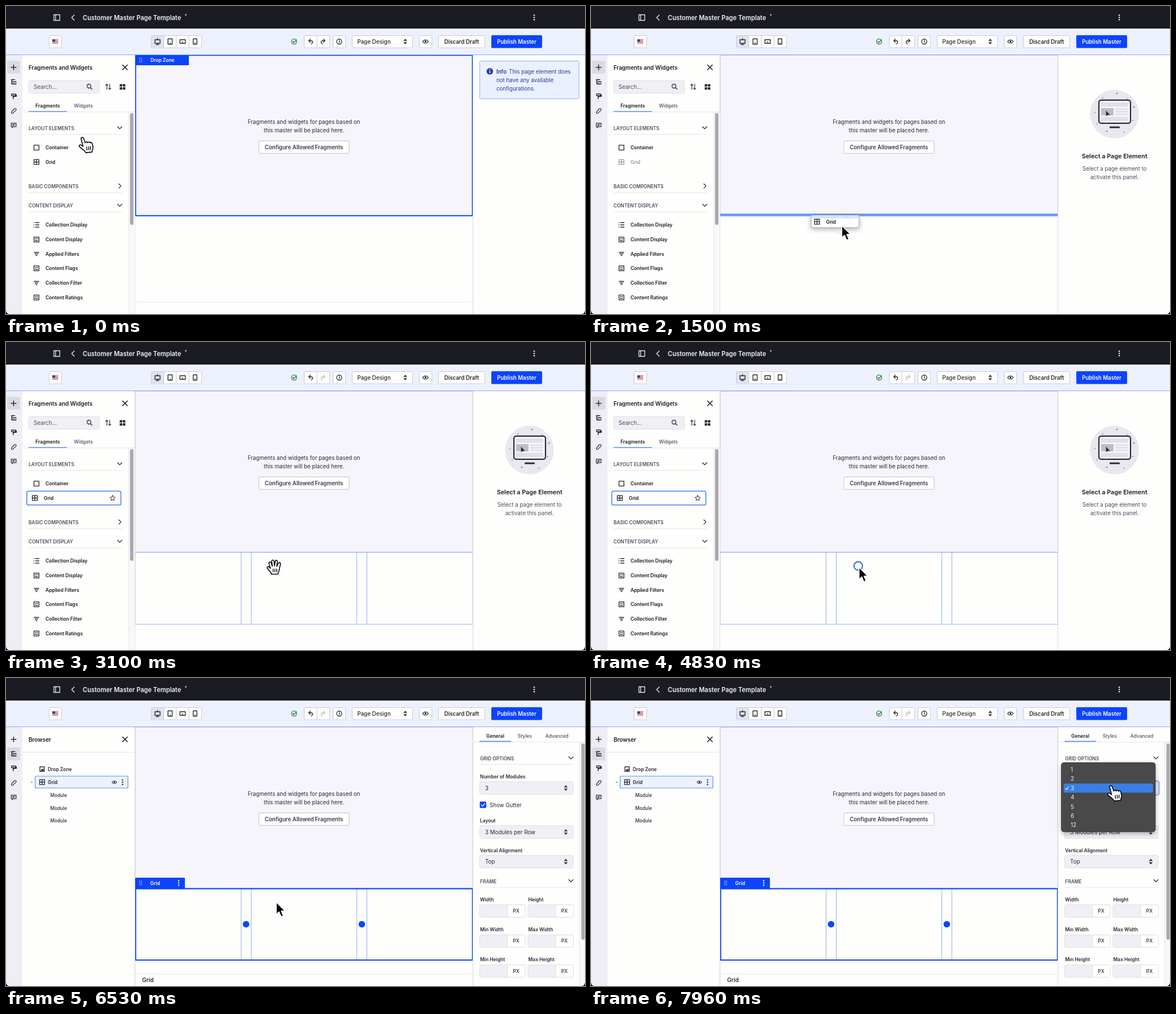
An HTML page that plays this animation: 1026x546 px, repeating every 8 s.

```html
<!DOCTYPE html>
<html lang="en">
<head>
<meta charset="utf-8">
<title>Page editor</title>
<style>
html, body { margin: 0; width: 100%; height: 100%; overflow: hidden; background: #fefefc; }
svg { display: block; width: 100vw; height: 100vh; }
text { font-family: Inter, "Open Sans", sans-serif; white-space: pre; }
</style>
</head>
<body>
<svg id="stage" viewBox="0 0 1026 546"></svg>
<script>
const INK = '#272833', DARK = '#1b1b24', GREY = '#4d4d60', BLUE = '#0b44fb', SOFT = '#5b8ff5',
  EDGE = '#cbcbd6', RULE = '#e5e5ec', FIELD = '#efeff5', PAPER = '#fefefc';

// Drawing helpers
const rect = (x, y, w, h, fill, stroke = 'none', r = 0, sw = 1) =>
  `<rect x="${x}" y="${y}" width="${w}" height="${h}" rx="${r}" fill="${fill}" stroke="${stroke}" stroke-width="${sw}"/>`;
const path = (d, stroke = INK, sw = 1.3, fill = 'none') =>
  `<path d="${d}" fill="${fill}" stroke="${stroke}" stroke-width="${sw}" stroke-linejoin="round" stroke-linecap="round"/>`;
const rule = (x1, y1, x2, y2, color = RULE, sw = 1) =>
  `<path d="M${x1} ${y1}L${x2} ${y2}" stroke="${color}" stroke-width="${sw}"/>`;
const dot = (x, y, r, fill = INK, stroke = 'none', sw = 1.2) =>
  `<circle cx="${x}" cy="${y}" r="${r}" fill="${fill}" stroke="${stroke}" stroke-width="${sw}"/>`;
const text = (x, y, s, size = 9.7, weight = 400, fill = INK, anchor = 'start') =>
  `<text x="${x}" y="${y + size * .364}" font-size="${size}" font-weight="${weight}" fill="${fill}" text-anchor="${anchor}">${s}</text>`;
const at = (x, y, body) => `<g transform="translate(${x} ${y})">${body}</g>`;
const group = (id, body) => `<g id="${id}">${body}</g>`;
const dots = (x, y, color) => [-4, 0, 4].map(d => dot(x, y + d, 1.25, color)).join('');
const grip = (x, y) => [-3, 0, 3].map(d => dot(x - 1.5, y + d, .8, '#fff') + dot(x + 1.5, y + d, .8, '#fff')).join('');
const chevron = (x, y) => path(`M${x - 3.8} ${y - 2}l3.8 3.8 3.8-3.8`);
const updown = (x, y) => path(`M${x - 2.6} ${y - 1.6}l2.6-3 2.6 3zM${x - 2.6} ${y + 1.6}l2.6 3 2.6-3z`, INK, .6, INK);
const closeX = () => path('M206.5 104.5l8.5 8.5m0-8.5l-8.5 8.5', DARK, 1.6);
const eye = (x, y, k = 1) => at(x, y, `<g transform="scale(${k})">` +
  path('M-5 0C-2.5-4 2.5-4 5 0C2.5 4-2.5 4-5 0Z', INK, 1.2) + dot(0, 0, 1.8) + '</g>');
const button = (x, w, body = '') => rect(x + .5, 52.5, w - 1, 21.5, PAPER, EDGE, 2) + body;

const icons = {
  box: path('M-4.4-4.4h8.8v8.8h-8.8z'),
  grid: path('M-4.4-4.4h8.8v8.8h-8.8zM0-4.4v8.8M-4.4 0h8.8'),
  list: path('M-1.5-4h6M-1.5 0h6M-1.5 4h6M-4.6-4h.4M-4.6 0h.4M-4.6 4h.4', INK, 1.4),
  content: path('M-4.4-4.4h8.8v8.8h-8.8z') + path('M-2-1.5h1.2M1-1.5h1.2M-2 1.8h4', INK, 1.5),
  filter: path('M-4.2-2.8h8.4M-2.6 0h5.2M-1 2.8h2', INK, 1.4),
  image: path('M-4-4h8v8h-8z') + path('M-2.4 2.6l2-2.6 1.4 1 1.4-2v3.6z', INK, .6, INK),
};
const item = (name, y, icon, x = 54) => at(x, y, icons[icon]) + text(x + 16, y, name, 8.55, 600, DARK);
const section = (name, y, x, right, open = true, color = GREY) => text(x, y, name, 8.4, 600, color) +
  rule(x, y + 10.5, right, y + 10.5) +
  (open ? chevron(right - 4.5, y - 1) : path(`M${right - 6} ${y - 5}l3.8 3.8-3.8 3.8`));

function topBars() {
  const device = (x, w, h, extra) => at(x, 63, path(`M${-w / 2}${-h / 2}h${w}v${h}h${-w}z`, INK, 1.4) + path(extra));
  return rect(0, 0, 1026, 40, DARK) +
    path('M84.8 15.5h10.5v10h-10.5zM87.8 15.5v10', '#e7e7ef', 1.3) + path('M121 16l-4.6 4.6 4.6 4.6', '#e7e7ef', 1.4) +
    text(136, 20.5, 'Customer Master Page Template', 11.05, 600, '#f2f2f6') + text(316.5, 17, '*', 8, 500, '#f2f2f6') +
    dots(936, 20.3, '#f2f2f6') +
    rect(0, 40, 1026, 46, '#ecf1fd') + rule(0, 86.5, 1026, 86.5, '#80acff', 1.2) +
    button(76, 23) + rect(82, 59, 10.5, 7.5, '#f4f0f2') +
    [59, 61.2, 63.4, 65.5].map(y => rect(82, y, 10.5, 1.1, '#d2455b')).join('') + rect(82, 59, 5, 4.2, '#30489a') +
    button(257, 90) + rect(258, 53, 21.5, 20.5, '#e0e3ee') + [279.5, 301.7, 324].map(x => rule(x, 52.5, x, 74, EDGE)).join('') +
    device(268.5, 9, 6.5, 'M-2.5 5.4h5M0 3.5v2M0-5.8v2') + device(290.8, 7.5, 9.5, 'M-.7 2.7h1.4') +
    device(313, 9.5, 6.5, 'M-.7 1h1.4') + device(335, 6.5, 9.5, 'M-.6 2.7h1.2') +
    dot(510.5, 63, 4.6, 'none', '#287d3c', 1.3) + path('M508.2 63l1.8 1.9 4.4-5', '#287d3c', 1.5) +
    button(528, 46) + rule(551, 52.5, 551, 74, EDGE) +
    path('M539.2 58.8l-2.7 2.7 2.7 2.7M536.7 61.5h3.4c4.4 0 4 5.4 .6 5.4') +
    group('redo', path('M562.6 58.8l2.7 2.7-2.7 2.7M565 61.5h-3.4c-4.4 0-4 5.4-.6 5.4')) +
    button(579, 23) + dot(590.5, 63, 4.5, 'none', INK, 1.3) + path('M590.5 60.6v2.6l1.6 1', INK, 1.1) +
    button(613, 108) + text(622.5, 63.2, 'Page Design', 9.85, 500) + updown(707.5, 63) +
    button(732, 23) + eye(743.3, 63) +
    button(766, 83) + group('discard', text(807.4, 63.2, 'Discard Draft', 9.7, 600, INK, 'middle')) +
    rect(860, 51.8, 90, 22.6, BLUE, 'none', 2) + text(905, 63.2, 'Publish Master', 9.7, 600, '#fff', 'middle');
}

function sidebar() {
  return rect(0, 87, 29, 459, '#eeeef5') +
    group('tabAdd', rect(2, 97, 23, 23, '#dadae4', 'none', 2)) + group('tabTree', rect(2, 123, 23, 23, '#dadae4', 'none', 2)) +
    path('M13.5 104.2v9M9 108.7h9', INK, 1.4) +
    path('M9.5 130.5h6M12.5 134.3h5.5M12.5 138.2h5.5M10.4 130.5v7.7h2', INK, 1.7) +
    path('M10 156h7v3h-7zM17 157.5h1.3v2.8h-5.5v4', INK, 1.6) +
    path('M10 187.4l4.5-5c2-2 4.8.5 3 2.5l-5 5c-1.6 1.5-4-.5-2.6-2.3l4-4.3', INK, 1.2) +
    path('M9.3 207.5h8.6v6.4h-5l-2 2v-2h-1.6zM11.5 209.7h4.5M11.5 211.7h3', INK, 1.2);
}

function fragmentsPanel() {
  const rows = [['Collection Display', 388, 'list'], ['Content Display', 414, 'content'], ['Applied Filters', 439.5, 'filter'],
    ['Content Flags', 465, 'content'], ['Collection Filter', 491, 'filter'], ['Content Ratings', 516.7, 'content']];
  return text(40, 109, 'Fragments and Widgets', 9.9, 600, DARK) + closeX() +
    rect(40.5, 132.5, 125, 22, FIELD, '#dedee7', 2) + text(49, 143.7, 'Search...', 9.8, 400, GREY) +
    dot(147, 142, 3.5, 'none', INK, 1.3) + path('M149.7 144.8l2.8 2.8') +
    path('M178.7 148v-9.6m-2.2 2.4l2.2-2.4 2.2 2.4M183.7 138.4v9.6m-2.2-2.4l2.2 2.4 2.2-2.4', INK, 1.1) +
    [[201.5, 138.5], [207, 138.5], [201.5, 144], [207, 144]].map(([x, y]) => rect(x, y, 4.5, 4.2, INK, 'none', .5)).join('') +
    text(74, 177, 'Fragments', 8.45, 600, DARK, 'middle') + text(137, 177, 'Widgets', 8.5, 500, GREY, 'middle') +
    rule(29, 187.8, 228, 187.8) + rule(40, 187, 108, 187, SOFT, 1.6) +
    rect(217.5, 188.5, 11, 358, '#f8f8f9', '#e6e6e9') + rect(219.8, 190, 6, 198, '#a8a8ad', 'none', 3) +
    section('LAYOUT ELEMENTS', 217, 40, 206) + group('headHot', text(40, 217, 'LAYOUT ELEMENTS', 8.4, 600, DARK)) +
    group('container', item('Container', 251, 'box')) + group('gridItem', item('Grid', 276.5, 'grid')) +
    group('focus', rect(36.8, -12.2, 166.8, 24.6, PAPER, SOFT, 3, 1.8) +
      path('M189-4.6l1.4 3 3.3.4-2.4 2.3.6 3.3-2.9-1.6-2.9 1.6.6-3.3-2.4-2.3 3.3-.4z', INK, 1)) +
    group('focusBox', item('Container', 251, 'box', 51)) + group('focusGrid', item('Grid', 276.5, 'grid', 51)) +
    section('BASIC COMPONENTS', 320.3, 40, 206, false) + section('CONTENT DISPLAY', 354.3, 40, 206) +
    rows.map(r => item(...r)).join('');
}

function browserPanel() {
  return text(40, 109, 'Browser', 10, 600, DARK) + closeX() + rule(29, 131.5, 228, 131.5) +
    at(64, 161.5, icons.image) + text(74, 161.6, 'Drop Zone', 8.45, 600) +
    rect(51.6, 174, 164.5, 21, '#edf2fe', SOFT, 2, 1.2) + rule(43.8, 184.8, 47.2, 184.8, GREY) +
    at(64, 184.5, icons.grid) + text(74, 184.6, 'Grid', 8.55, 600) + eye(192, 184.7, .85) + dots(206.5, 184.7, INK) +
    [207.5, 230.5, 253.3].map(y => text(78.5, y, 'Module', 8.25, 500)).join('');
}

function canvas() {
  const columns = [416.7, 434.5, 621.7, 639.5].map(x => rule(x, 373, x, 500, '#8fb1f8')).join('');
  return rect(229, 87, 598, 285, '#f6f5fc') +
    group('dropIdle', rect(228.8, 87, 598.4, 285.3, 'none', '#b3bce2')) +
    group('dropHover', rect(229.3, 87.3, 597.5, 285, 'none', '#80a5fb', 0, 1.6)) +
    group('dropOn', rect(229.6, 87.3, 597, 284.4, 'none', BLUE, 0, 2) + rect(229, 87, 95, 18, BLUE) +
      grip(238.7, 96) + text(256, 96.2, 'Drop Zone', 8.45, 600, '#fff')) +
    text(528, 205, 'Fragments and widgets for pages based on', 9.72, 400, INK, 'middle') +
    text(528, 220, 'this master will be placed here.', 9.72, 400, INK, 'middle') +
    rect(448, 239.2, 160, 22, PAPER, '#c3c3cd', 2) +
    text(528, 250.3, 'Configure Allowed Fragments', 9.68, 600, '#393a4a', 'middle') +
    group('bar', rect(229, 368, 598, 4.6, '#6c9cf8')) +
    group('gridFrame', columns + rect(228.9, 373, 598.2, 127.3, 'none', '#8fb1f8')) +
    group('gridOn', rect(229.7, 373.6, 597, 126.4, 'none', BLUE, 0, 2) + rect(229, 354, 88, 19, BLUE, 'none', 1) +
      grip(238.7, 363.3) + text(255.5, 363.4, 'Grid', 8.6, 600, '#fff') + dots(306, 363.5, '#fff') +
      dot(425.4, 436.5, 5.8, BLUE) + dot(630.5, 436.5, 5.8, BLUE)) +
    group('footer', rule(229, 524.7, 827, 524.7)) + group('crumb', text(241.3, 535.7, 'Grid', 10, 600)) +
    rule(228.5, 87, 228.5, 546, '#cfcfda') + rule(827.5, 87, 827.5, 546, '#dadae2');
}

function infoPanel() {
  const navy = '#253f96', line = (y, s, x = 869) => text(x, y, s, 9.68, 400, navy);
  return rect(839.5, 97.5, 176, 67, '#ebf0fe', '#8badf8', 2) + dot(857.3, 115.8, 5.8, navy) +
    rect(856.6, 115, 1.5, 4, '#fff') + dot(857.3, 112.9, .95, '#fff') +
    text(869, 116.5, 'Info', 9.7, 600, navy) + line(116.5, 'This page element does', 891) +
    line(131.5, 'not have any available') + line(146.5, 'configurations.');
}

function emptyPanel() {
  const sparks = [[932, 155], [907, 163], [950, 165], [962, 179], [893, 189], [897, 209], [914, 222], [944, 224], [960, 203]];
  return dot(927.5, 191.5, 43.3, '#e8e8f0') +
    sparks.map(([x, y], i) => path(`M${x - 1} ${y}h2m-1-1v2`, i % 3 ? '#8f8fa3' : '#4b4b5c', .8)).join('') +
    rect(900, 166.8, 56, 41, '#f7f7fa', '#292a38', 4, 2.2) +
    rect(904, 171, 48, 7.5, '#e0e0e9', 'none', 2) + rect(904, 181, 22, 13, '#bdbdca', 'none', 2) +
    [181.5, 186, 190.5].map(y => rect(928.5, y, 23.5, 3, '#e0e0e9', 'none', 1)).join('') + rect(904, 196.5, 48, 7.5, '#e0e0e9', 'none', 2) +
    path('M913 186.5v8.5l2.3-2 3.6-.2z', INK, .6, INK) + rect(919, 213.5, 18, 3, '#292a38', 'none', 1) +
    text(927.7, 266.3, 'Select a Page Element', 10.85, 600, DARK, 'middle') +
    text(927.7, 288, 'Select a page element to', 9.72, 400, GREY, 'middle') + text(927.7, 303, 'activate this panel.', 9.72, 400, GREY, 'middle');
}

function optionsPanel() {
  const label = (x, y, s) => text(x, y, s, 8.45, 600);
  const select = (y, s) => rect(839.5, y - 11.2, 165.5, 22.4, FIELD, '#dedee7', 2) + text(849, y + .2, s, 9.75) + updown(992, y);
  const size = (x, y, s) => label(x, y, s) + rect(x - .5, y + 9.5, 80, 22, FIELD, '#dedee7', 2) +
    rect(x + 48.5, y + 9.5, 31.5, 22, PAPER, '#dedee7', 2) + text(x + 64, y + 20.6, 'PX', 8.5, 500, INK, 'middle');
  return text(867, 102.7, 'General', 8.45, 600, DARK, 'middle') + text(919.3, 102.7, 'Styles', 8.45, 500, GREY, 'middle') +
    text(976.3, 102.7, 'Advanced', 8.45, 500, GREY, 'middle') +
    rule(828, 113.4, 1026, 113.4) + rule(839, 112.4, 895, 112.4, SOFT, 1.6) +
    rect(1016.5, 114, 11, 434, '#f8f8f9', '#e6e6e9') + rect(1019.6, 116, 5.8, 348, '#a8a8ad', 'none', 3) +
    section('GRID OPTIONS', 142.8, 840, 1005.5) + label(840, 175, 'Number of Modules') + select(195, '3') +
    rect(839.5, 219, 11.5, 11.5, BLUE, 'none', 2) + path('M842.3 225l2.2 2.2 3.8-4.6', '#fff', 1.4) + text(857, 225.2, 'Show Gutter') +
    label(840, 253.3, 'Layout') + select(273, '3 Modules per Row') +
    label(840, 306, 'Vertical Alignment') + select(325.5, 'Top') + section('FRAME', 360.5, 840, 1005.5) +
    ['Width', 'Min Width', 'Min Height'].map((s, i) => size(840, 392.6 + 53.2 * i, s)).join('') +
    ['Height', 'Max Width', 'Max Height'].map((s, i) => size(925.5, 392.6 + 53.2 * i, s)).join('');
}

function menu() {
  return rect(838.3, 182.5, 168.3, 25, 'none', '#80acff', 3.5, 2) +
    `<g filter="url(#shadow)">${rect(833.5, 150, 166.5, 122.7, '#48484a', '#3a3a3c', 4.5)}</g>` +
    rect(837.5, 187, 158.5, 16.3, '#3a7ee6', 'none', 2.5) + path('M841 195.7l1.8 2.4 3.2-5.4', '#fff', 1.2) +
    [1, 2, 3, 4, 5, 6, 12].map((n, i) => text(850, 162.2 + 16.45 * i, n, 9.8, 400, '#f3f3f4')).join('');
}

const preview = `<g filter="url(#shadow)">${rect(.5, .5, 85, 22, PAPER, '#9b9ca9', 2)}</g>` +
  rect(1, 1, 84, 5, '#d5e3fb') + at(11, 12, icons.grid) + text(27, 12, 'Grid', 8.55, 600, DARK);
const arrow = path('M0 0V21.2L4.9 16.8 8.5 25.6 12.3 24 8.8 15.4H15.4Z', '#fff', 1.4, '#050505');
const pointer = path('M-3 1.8C-3.4-.8.6-1.6 1.6 1.2L4.4 9C5 7 8 6.8 8.8 9 9.6 7 12.4 7 13 9.2 14 7.8 16.2 8.2 16.8 10.2L18 16C18.6 20 16.6 22 16.4 25.4L5.4 26.6C4.6 23.5-1.2 20.5-6 15.6-7.6 13.6-4.6 11.6-2.6 13.2L.6 15.4Z', '#050505', 1.6, '#fff') +
  path('M7 16.4l.6 5.6M10.4 16l.5 5.6M13.6 15.6l.3 5.6', '#050505', 1.4);
const openHand = path('M-4.5 12C-5 9.6-9 5-12 1.5-13.4-.8-10.4-2.4-8.6-.6L-6.4 1.8-9-7C-9.4-9.6-6-10.4-5.2-8L-3-2-4.2-11C-4-13.6-.6-13.8-.2-11.2L.8-2.6 2.2-11C2.8-13.4 6-13 5.8-10.4L4.8-1.8 8-7.6C9.4-9.6 12.2-8.2 11.4-5.8 10.2-1.4 9.6 2 9 5 8.6 8 7 9.6 6.6 12Z', '#050505', 1.6, '#fff') +
  path('M-1.6 3v5M1.6 3v5M4.8 3v5', '#050505', 1.4);

document.getElementById('stage').innerHTML =
  '<defs><filter id="shadow" x="-30%" y="-30%" width="160%" height="180%"><feDropShadow dx="0" dy="3" stdDeviation="4" flood-opacity=".28"/></filter></defs>' +
  rect(0, 0, 1026, 546, PAPER) + canvas() + topBars() + sidebar() +
  group('fragments', fragmentsPanel()) + group('browser', browserPanel()) +
  group('info', infoPanel()) + group('empty', emptyPanel()) + group('options', optionsPanel()) + group('menu', menu()) +
  path('M0 540V546H6Q1 546 0 540ZM1026 540V546H1020Q1025 546 1026 540Z', 'none', 0, '#000') +
  group('preview', preview) + group('ring', '<circle fill="none" stroke-width="2"/>') +
  group('cursor', group('pointer', pointer) + group('openHand', openHand) + group('arrow', arrow));

const el = {};
document.querySelectorAll('[id]').forEach(e => el[e.id] = e);
const ring = el.ring.firstChild;

const LOOP = 8000, LIFT = 1090, DROP = 2700, PICK = 4960, OPEN = 7500;
const PRESSES = [960, 4830, 7430], RING_TIME = 545;
// start, end, from x, y, to x, y
const MOVES = [[30, 660, 136, 233.5, 105, 277], [1080, 1660, 105, 277, 475, 399.5], [6430, 7200, 475, 399.5, 922, 191.5]];

const clamp = v => Math.min(1, Math.max(0, v));
const ease = p => p < .5 ? 4 * p ** 3 : 1 - 4 * (1 - p) ** 3;
const show = (id, on) => el[id].style.display = on ? '' : 'none';
const place = (id, x, y) => el[id].setAttribute('transform', `translate(${x} ${y})`);

function cursorAt(t) {
  const [t0, t1, x0, y0, x1, y1] = MOVES.filter(m => t >= m[0]).pop() || MOVES[0];
  const p = ease(clamp((t - t0) / (t1 - t0)));
  return [x0 + (x1 - x0) * p, y0 + (y1 - y0) * p];
}

function draw(t) {
  const [x, y] = cursorAt(t);
  const lifted = t >= LIFT && t < DROP, picked = t >= PICK;
  const overBox = t < 960 && y > 238.5 && y < 263.5;
  const onGrid = !lifted && (t >= DROP || y >= 263.5);

  show('headHot', t < 960 && y < 229);
  show('container', !overBox); show('focusBox', overBox);
  show('gridItem', !onGrid); show('focusGrid', onGrid);
  show('focus', overBox || onGrid);
  place('focus', 0, overBox ? 251 : 276.5);
  el.gridItem.style.opacity = lifted ? .45 : 1;

  show('fragments', !picked); show('browser', picked);
  show('tabAdd', !picked); show('tabTree', picked);
  show('info', t < LIFT); show('empty', t >= LIFT && !picked); show('options', picked);

  const hovering = t >= 6590 && t < 6990;
  show('dropOn', t < LIFT); show('dropHover', hovering); show('dropIdle', t >= LIFT && !hovering);
  show('bar', lifted && x > 229);
  show('gridFrame', t >= DROP); show('gridOn', picked);
  show('footer', t < LIFT || picked); show('crumb', picked);
  el.redo.style.opacity = t >= DROP ? .3 : 1;
  el.discard.style.opacity = t >= DROP && t < 2960 ? .4 : 1;
  show('menu', t >= OPEN);

  const settle = clamp((t - 1510) / 150);
  show('preview', lifted);
  place('preview', x - 55 + 11 * settle, y - 19 + 4 * settle + (t >= 1900 ? 1 : 0));

  const press = PRESSES.filter(p => t >= p).pop();
  const age = (t - press) / RING_TIME;
  show('ring', age < 1);
  if (age < 1) {
    place('ring', x - 1.5, y - 2.5);
    ring.setAttribute('r', 7.5 + 9.5 * age);
    ring.setAttribute('stroke', age > .9 ? '#777' : '#2c63ea');
    ring.style.opacity = Math.max(.07, 1 - age);
  }

  const kind = x > 839 || (t < 960 && y < 238.5) ? 'pointer'
    : t < 960 || (t >= 2760 && t < 4830) ? 'openHand' : 'arrow';
  for (const k of ['pointer', 'openHand', 'arrow']) show(k, k === kind);
  place('cursor', x, y);
}

const begin = performance.now();
(function tick() {
  draw((performance.now() - begin) % LOOP);
  requestAnimationFrame(tick);
})();
</script>
</body>
</html>
```
